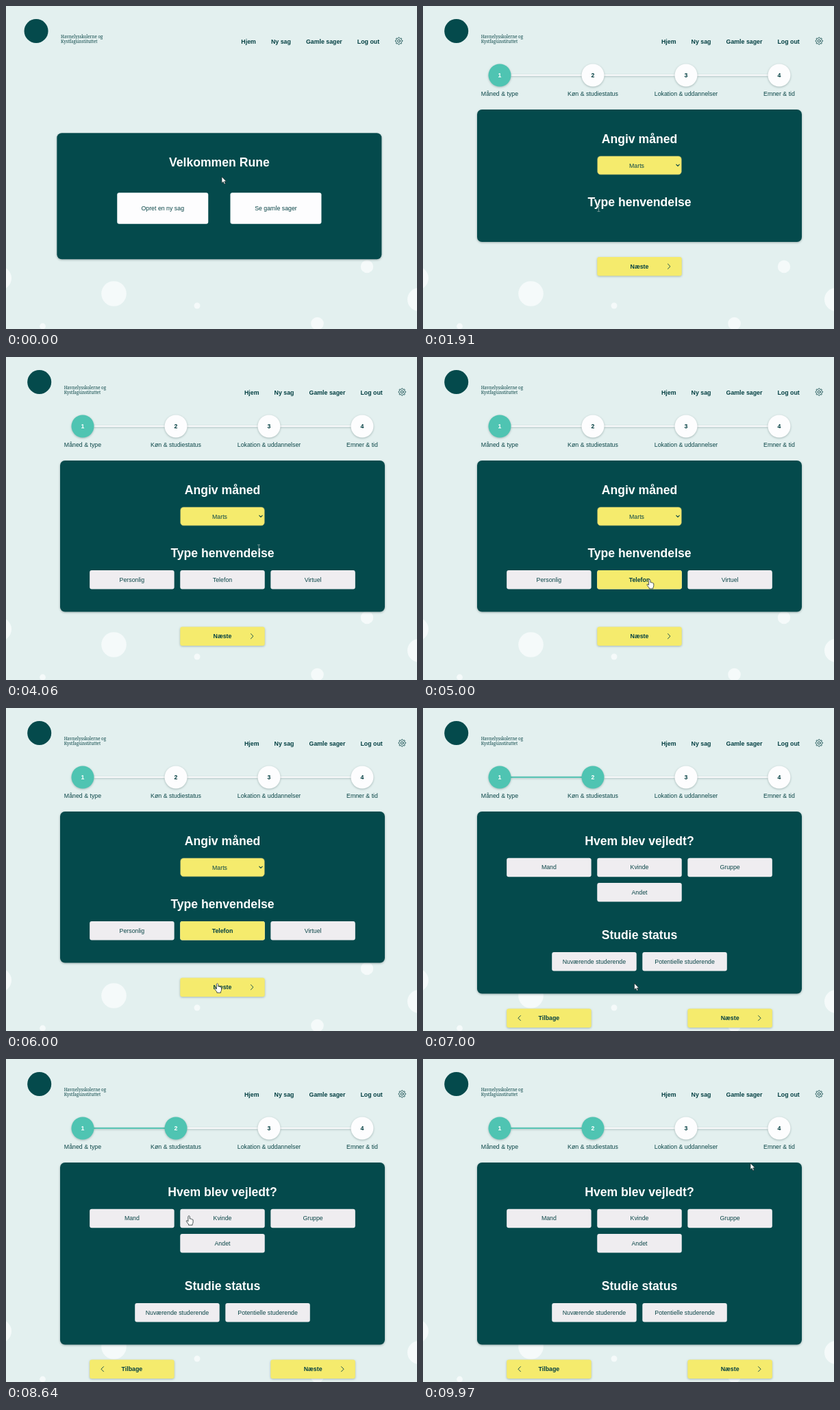
Write an HTML page that moves like this. It is 600 px wide and 471 px high and loops after 10000 ms.

```html
<!DOCTYPE html>
<html lang="da">
<head>
<meta charset="utf-8">
<title>Sagsregistrering</title>
<style>
  html, body { margin: 0; width: 100%; height: 100%; overflow: hidden; background: #e3f0ef; }
  svg { display: block; width: 100%; height: 100%; }
  text { font: 8.8px "Liberation Sans", Arial, sans-serif; fill: #0b4648; text-anchor: middle; pointer-events: none; }
  .bold { font-weight: bold; fill: #033f42; }
  .lit { font-weight: bold; fill: #fff; }
  .head { font-size: 17.6px; font-weight: bold; fill: #fff; pointer-events: auto; }
  .nav { font-weight: bold; fill: #033f42; text-anchor: start; }
  .org { font: 6.2px "Noto Serif", serif; text-anchor: start; }
  .panel { filter: drop-shadow(0 1.6px 1.8px rgba(0, 30, 30, .33)); }
  .raised { filter: drop-shadow(0 1.4px 1.4px rgba(0, 40, 40, .28)); }
  .line { fill: none; stroke: #0b4648; stroke-linecap: round; stroke-linejoin: round; pointer-events: none; }
  #cursor { pointer-events: none; }
</style>
</head>
<body>
<svg id="stage" viewBox="0 0 600 471"></svg>
<script>
const LOOP = 10000, MID = 316, COLUMN = 132.1, SCROLLBAR = 9.3;
const DARK = '#044a4c', WHITE = '#fdfdfe', GREY = '#efedf0', YELLOW = '#f5eb6d', TEAL = '#4fc4b2';

const group = (id, ...parts) => `<g id="${id}">${parts.join('')}</g>`;
const text = (x, y, s, cls = '') => `<text class="${cls}" x="${x}" y="${y}">${s}</text>`;
const head = (y, s) => text(MID, y, s, 'head');
const box = (cx, y, w, h, r, fill, cls = '') =>
  `<rect class="${cls}" x="${cx - w / 2}" y="${y}" width="${w}" height="${h}" rx="${r}" fill="${fill}"/>`;
const disc = (x, y, r, fill, cls = '') =>
  `<circle class="${cls}" cx="${x}" cy="${y}" r="${r}" fill="${fill}"/>`;
const line = (d, width) => `<path class="line" d="${d}" stroke-width="${width}"/>`;
const panel = (y, h) => box(MID, y, 474, h, 7, DARK, 'panel');

// Buttons sit on a grid of columns counted from the middle
function button(col, y, label, fill = GREY, cls = '') {
  const x = MID + col * COLUMN;
  return box(x, y, 123.5, 27.5, 3, fill, 'hot') + text(x, y + 16.6, label, cls);
}

function action(col, y, label, dir) {
  const x = MID + col * COLUMN + 43.2 * dir, w = 1.8 * dir;
  return `<g class="raised">${button(col, y, label, YELLOW, 'bold')}</g>` +
    line(`M${x - w} ${y + 10.1}l${2 * w} 3.6l${-2 * w} 3.6`, .9);
}

function bigButton(side, label) {
  const x = MID + side * 82.6;
  return box(x, 272.3, 133, 45.4, 3, WHITE, 'hot') + text(x, 297.8, label);
}

function gear(cx, cy) {
  const points = Array.from({ length: 64 }, (_, i) => {
    const a = i / 32 * Math.PI, r = 4.6 + .8 * Math.cos(8 * a);
    return `${(cx + r * Math.cos(a)).toFixed(2)} ${(cy + r * Math.sin(a)).toFixed(2)}`;
  });
  return line(`M${points.join('L')}Z`, .9) +
    `<circle class="line" cx="${cx}" cy="${cy}" r="1.9" stroke-width=".9"/>`;
}

function header() {
  const links = ['Hjem', 'Ny sag', 'Gamle sager', 'Log out'];
  const spans = links.map((s, i) => `<tspan dx="${i && 22.1}">${s}</tspan>`).join('');
  return disc(48.7, 36.5, 17.5, DARK) +
    text(84.7, 47, 'Havnelysskolerne og', 'org') + text(84.7, 53.8, 'Kystfagsinstituttet', 'org') +
    text(348, 55, spans, 'nav') + gear(578.2, 51);
}

function steps(done) {
  const labels = ['Måned &amp; type', 'Køn &amp; studiestatus', 'Lokation &amp; uddannelser', 'Emner &amp; tid'];
  return labels.map((s, i) => {
    const x = 112 + 136 * i, on = i < done;
    const bar = i < 3 ? box(x + 68, 99.9, 104, 1.9, 0, i < done - 1 ? TEAL : WHITE, 'raised') : '';
    return bar + disc(x, 101, 16.5, on ? TEAL : WHITE, 'raised') +
      text(x, 104.1, i + 1, on ? 'lit' : 'bold') + text(x, 130.8, s);
  }).join('');
}

const bubbles = [[-9, 397, 17], [157.5, 419.5, 18.3], [279, 437, 4.5], [527, 380, 9.2],
  [454.5, 463, 9.3], [603, 428, 17], [53.5, 467, 4.4]]
  .map(([x, y, r]) => disc(x, y, r, '#f5fafa')).join('');

const month = head(199.8, 'Angiv måned') +
  `<g stroke="#a5aa6c" stroke-width=".6">${box(MID, 219, 122.6, 26.8, 4.5, YELLOW, 'hot')}</g>` +
  text(312, 235.6, 'Marts') + line('M369.8 231.2l2.2 2.2l2.2 -2.2', 1.2) + head(291.8, 'Type henvendelse');

const cursors =
  group('pointer', '<path d="M0 0V9.3L2.2 7.3L3.7 10.8L5.3 10.1L3.8 6.8H6.7Z" fill="#fff" stroke="#1c2b2d" stroke-width=".7"/>') +
  group('beam', '<path d="M-2 -4.6H2M0 -4.6V4.6M-2 4.6H2" fill="none" stroke="#8ba3a2" stroke-width=".8"/>') +
  group('hand', '<path d="M-1.2 1.1Q0 -1 1.2 1.1V4.6Q2 4 3 4.9Q4 4.4 4.6 5.4Q5.9 5.2 6 6.6V9.4Q6 11 5 12.2V13.7H-.6V12.4Q-2.4 10.6 -3.7 8.2Q-4 7 -2.8 7.1L-1.2 8.4Z" fill="#fff" stroke="#1c2b2d" stroke-width=".8"/>');

const stage = document.getElementById('stage');
stage.innerHTML = bubbles +
  group('header', header()) +
  group('welcome', panel(185.3, 184), head(234.4, 'Velkommen Rune'),
    bigButton(-1, 'Opret en ny sag'), bigButton(1, 'Se gamle sager')) +
  group('stepsOne', steps(1)) +
  group('shortForm', panel(151, 193), month, action(0, 366, 'Næste', 1)) +
  group('fullForm', panel(151, 220.5), month,
    button(-1, 311, 'Personlig'), button(0, 311, 'Telefon'), button(1, 311, 'Virtuel'),
    group('chosen', button(0, 311, 'Telefon', YELLOW, 'bold')), action(0, 393.5, 'Næste', 1)) +
  group('stepsTwo', steps(2)) +
  group('status', panel(151, 265.5), head(199.8, 'Hvem blev vejledt?'),
    ['Mand', 'Kvinde', 'Gruppe'].map((s, i) => button(i - 1, 218.7, s)).join(''),
    button(0, 255, 'Andet'), head(337, 'Studie status'),
    button(-.5, 356, 'Nuværende studerende'), button(.5, 356, 'Potentielle studerende'),
    action(-1, 438.5, 'Tilbage', -1), action(1, 438.5, 'Næste', 1)) +
  group('cursor', cursors);

const $ = id => document.getElementById(id);
const show = (id, on) => { $(id).style.display = on ? '' : 'none'; };

const FORM = 1910, GROW = 2210, CHOOSE = 4850, NEXT = 6180;
const visible = {
  welcome: [0, FORM], stepsOne: [FORM, NEXT], shortForm: [FORM, GROW],
  fullForm: [GROW, NEXT], chosen: [CHOOSE, NEXT], stepsTwo: [NEXT, LOOP], status: [NEXT, LOOP]
};

// Each sweep starts where the last one ended and passes its stops [ms, x, y]
const home = [315, 249];
const sweeps = [
  [1180, [1420, 256.5, 295]],
  [3270, [4060, 369, 278.5], [4550, 332, 320]],
  [CHOOSE, [5950, 308.5, 401.5]],
  [6970, [7700, 306, 353.5], [8640, 267, 228.5], [9030, 412, 300], [9430, 300, 362], [9970, 478, 152]]
];
let rest = home;
const paths = sweeps.map(([start, ...stops]) => {
  const path = [[start, ...rest], ...stops];
  rest = stops[stops.length - 1].slice(1);
  return path;
});

function slope(p, i, k) {
  const a = p[i - 1], b = p[i + 1];
  return a && b ? (b[k] - a[k]) / (b[0] - a[0]) : 0;
}

function pointerAt(t) {
  const p = paths.filter(path => path[0][0] <= t).pop();
  if (!p) return home;
  const i = p.findIndex(stop => stop[0] > t) - 1;
  if (i < 0) return p[p.length - 1].slice(1);
  const a = p[i], b = p[i + 1], d = b[0] - a[0], u = (t - a[0]) / d, v = 1 - u;
  return [1, 2].map(k => v * v * (1 + 2 * u) * a[k] + u * u * (1 + 2 * v) * b[k] +
    d * u * v * (v * slope(p, i, k) - u * slope(p, i + 1, k)));
}

function cursorKind(x, y) {
  const over = document.elementFromPoint(x, y)?.closest('.hot, .head');
  return !over ? 'pointer' : over.matches('.hot') ? 'hand' : 'beam';
}

function draw(t) {
  for (const id in visible) show(id, t >= visible[id][0] && t < visible[id][1]);
  // The first view has a scrollbar, so its centred content sits further left
  const shift = `translate(${-SCROLLBAR / 2} 0)`;
  $('welcome').setAttribute('transform', shift);
  $('header').setAttribute('transform', t < FORM ? shift : '');

  const [x, y] = pointerAt(t), kind = cursorKind(x, y);
  for (const k of ['hand', 'beam', 'pointer']) show(k, k === kind);
  $('cursor').setAttribute('transform', `translate(${x.toFixed(2)} ${y.toFixed(2)})`);
}

const start = performance.now();
function tick() {
  draw((performance.now() - start) % LOOP);
  requestAnimationFrame(tick);
}
tick();
</script>
</body>
</html>
```
